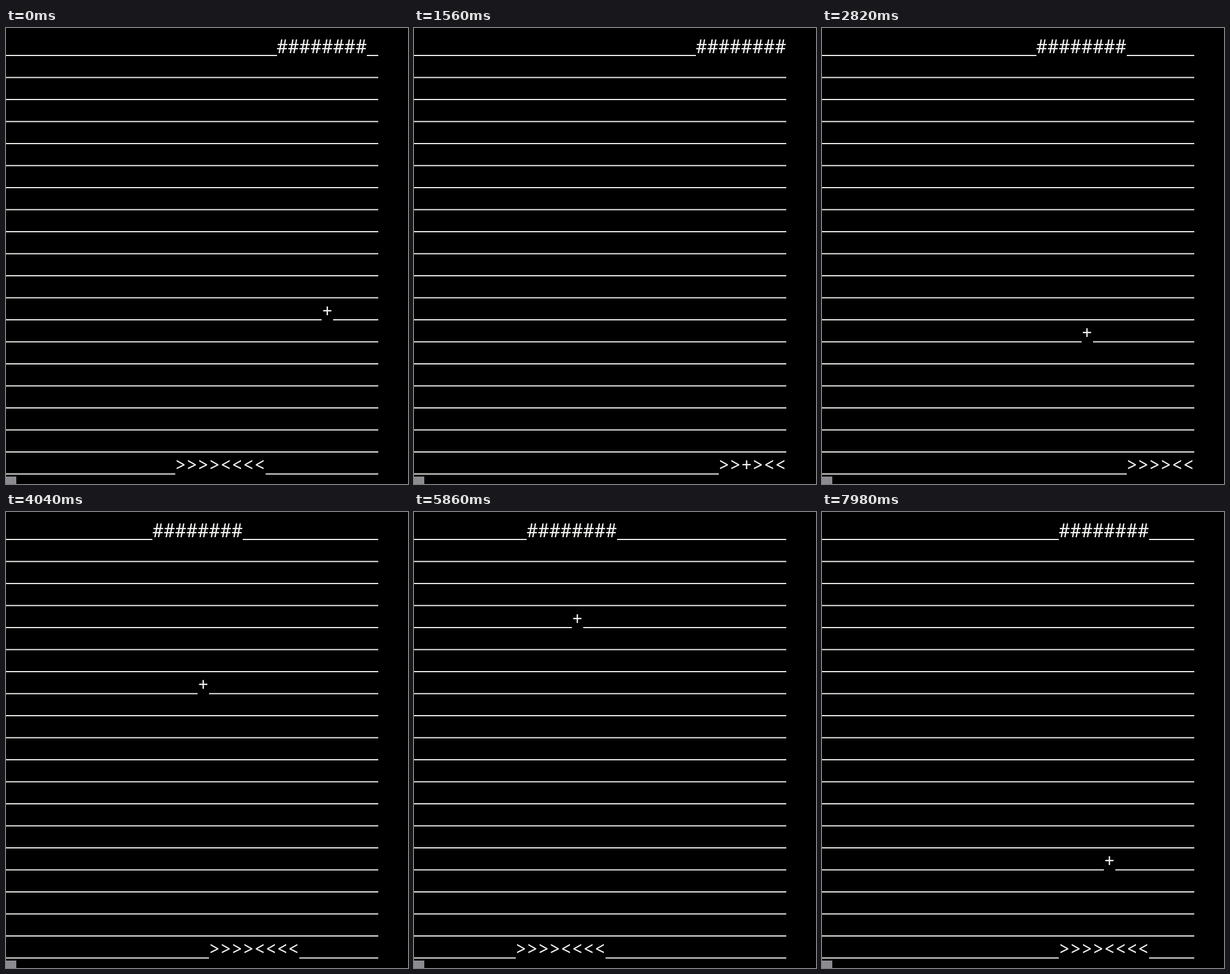
An HTML page with a canvas for the animation above (8000 ms loop, 703 px wide and 797 px high).

```html
<!DOCTYPE html>
<html lang="en">
<head>
<meta charset="utf-8">
<title>Terminal paddle game</title>
<style>
  html, body { margin: 0; width: 100%; height: 100%; overflow: hidden; background: #000; }
  canvas { display: block; }
</style>
</head>
<body>
<canvas id="screen" width="703" height="797"></canvas>
<script>
const ctx = document.getElementById('screen').getContext('2d');
const LOOP = 8000, TICK = 202, TICK_OFFSET = 92;
const COLS = 33, ROWS = 20, CELL_W = 19.73, ROW_H = 38.5;
const FIRST_LINE = 47, LINE_H = 2, BASELINE_GAP = 3.5;
const INK = '#f2f2f0';
const TOP = '########', BOTTOM = '>>>><<<<';

// [tick, left column] of the player's paddle, which jumps three cells at a time
const PLAYER = [[0, 15], [2, 21], [4, 27], [13, 27], [19, 18], [28, 9], [39, 21]];

function playerCol(tick) {
  const i = Math.max(1, PLAYER.findIndex(([k]) => k >= tick));
  const [k0, c0] = PLAYER[i - 1], [k1, c1] = PLAYER[i];
  return 3 * Math.round((c0 + (c1 - c0) * (tick - k0) / (k1 - k0)) / 3);
}

// Diagonal flight: right wall at tick 4, player at 7, opponent at 25
function ballAt(tick) {
  if (tick >= 25) return { col: tick - 14, row: tick - 24 };
  return {
    col: 32 - Math.abs(tick - 4),
    row: 19 - Math.abs(tick - 7)
  };
}

function put(grid, row, col, text) {
  [...text].forEach((ch, i) => {
    if (col + i >= 0 && col + i < COLS) grid[row][col + i] = ch;
  });
}

function drawRow(cells, row) {
  const y = FIRST_LINE + row * ROW_H;
  let start = 0;
  for (let c = 0; c <= COLS; c++) {
    if (c < COLS && cells[c] === '_') continue;
    if (c > start) {
      const x0 = Math.round(start * CELL_W), x1 = Math.round(c * CELL_W);
      ctx.fillRect(x0, y, x1 - x0, LINE_H);
    }
    if (c < COLS) ctx.fillText(cells[c], (c + 0.48) * CELL_W, y - BASELINE_GAP);
    start = c + 1;
  }
}

function draw(time) {
  const tick = Math.min(39, Math.max(0, Math.floor((time - TICK_OFFSET) / TICK)));
  const ball = ballAt(tick);
  const grid = Array.from({ length: ROWS }, () => Array(COLS).fill('_'));
  put(grid, 0, ball.col - 4, TOP);
  put(grid, ROWS - 1, playerCol(tick), BOTTOM);
  put(grid, ball.row, ball.col, '+');

  ctx.fillStyle = '#000';
  ctx.fillRect(0, 0, 703, 797);
  ctx.fillStyle = INK;
  ctx.font = '32.85px "Noto Sans Mono", monospace';
  ctx.textAlign = 'center';
  ctx.textBaseline = 'alphabetic';
  grid.forEach(drawRow);

  ctx.fillStyle = '#8c8c90';
  ctx.fillRect(0, 784, 18, 13);
}

const began = performance.now();
function loop() {
  draw((performance.now() - began) % LOOP);
  requestAnimationFrame(loop);
}
loop();
</script>
</body>
</html>
```
